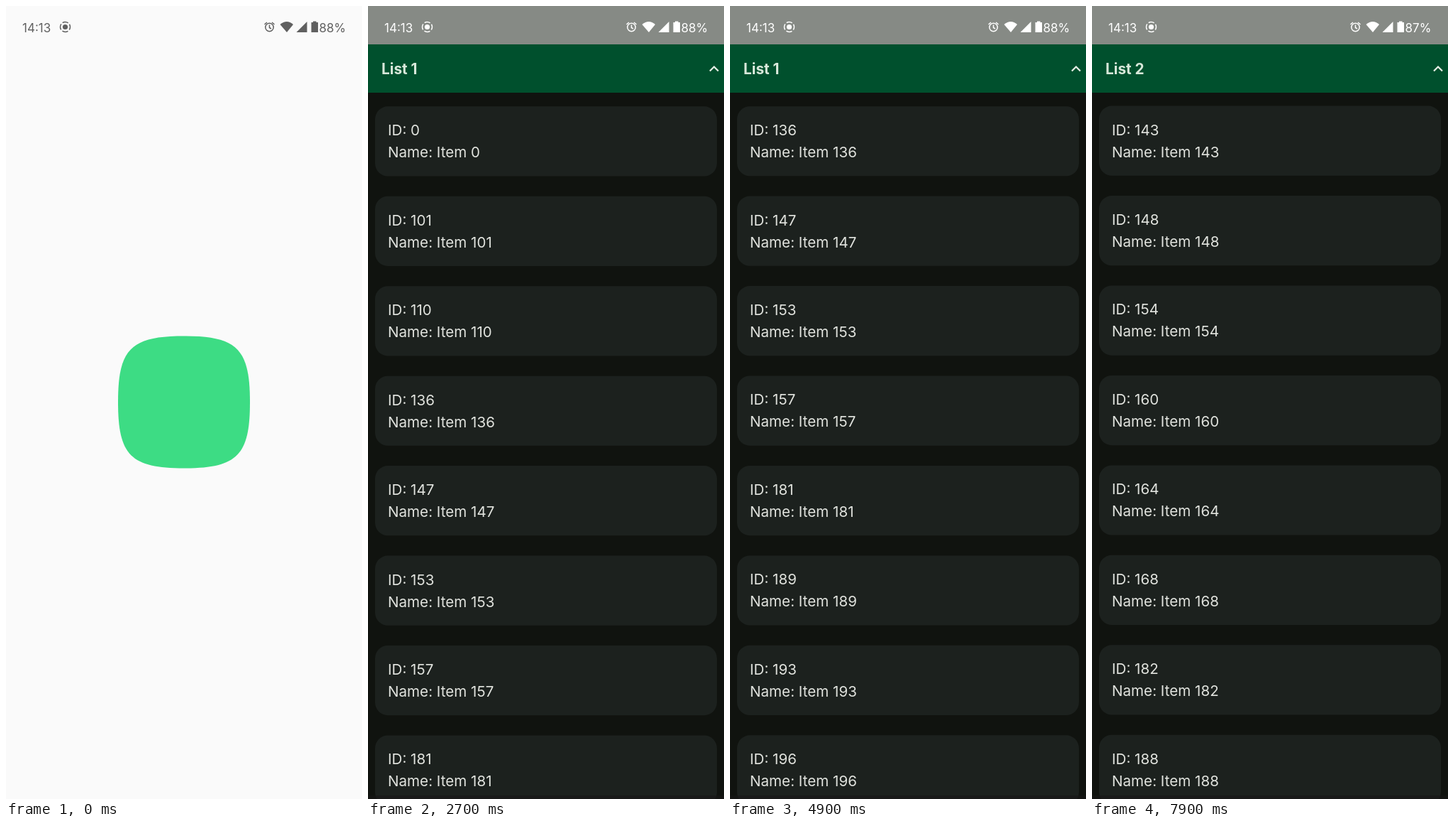
An HTML page for the animation above (8000 ms loop, 502 by 1116 pixels).

```html
<!DOCTYPE html>
<html lang="en">
<head>
<meta charset="utf-8">
<title>Expandable lists</title>
<style>
  html, body { margin: 0; width: 100%; height: 100%; overflow: hidden; background: #10130f; }
  svg { display: block; width: 502px; height: 1116px; font-family: Inter, Roboto, sans-serif; }
  .card rect { fill: #1c211e; }
  .card text { fill: #e1e3de; font-size: 20.6px; }
  .head text { fill: #d8e8da; font-size: 20.8px; font-weight: 700; }
  .head path { fill: none; stroke: #e6efe6; stroke-width: 2.2; }
  #status text { font-size: 17px; }
</style>
</head>
<body>
<svg id="stage" viewBox="0 0 502 1116">
  <defs>
    <radialGradient id="wave" gradientUnits="userSpaceOnUse" cx="251" cy="34" r="1">
      <stop offset=".84" stop-color="#fff" stop-opacity=".085"/>
      <stop offset="1" stop-color="#fff" stop-opacity="0"/>
    </radialGradient>
    <radialGradient id="reveal" gradientUnits="userSpaceOnUse" cx="251" cy="-3" r="1">
      <stop id="inner" offset=".842" stop-color="#fafafa"/>
      <stop offset="1" stop-color="#fafafa"/>
    </radialGradient>
  </defs>
  <rect width="502" height="1116" fill="#fafafa"/>
  <g id="app">
    <rect width="502" height="1116" fill="#10130f"/>
    <path id="spinner" fill="none" stroke="#2ae77f" stroke-width="4.8" stroke-linecap="round"/>
    <g id="lists"></g>
    <rect y="1111" width="502" height="5" fill="#181616" opacity=".6"/>
    <rect width="502" height="54" fill="#868a85"/>
  </g>
  <g id="splash">
    <rect width="502" height="1116" fill="url(#reveal)"/>
    <path id="icon" fill="#3ddc84" d="M251 464.500c75 0 93 18 93 93s-18 93-93 93s-93-18-93-93s18-93 93-93Z"/>
  </g>
  <g id="status">
    <text x="23" y="36.500">14:13</text>
    <circle cx="83.500" cy="29.500" r="3.600"/>
    <circle cx="83.500" cy="29.500" r="7" fill="none" stroke="currentColor" stroke-width="1.500" stroke-dasharray="8.500 2.500" stroke-dashoffset="4.250"/>
    <g fill="none" stroke="currentColor" stroke-width="1.500">
      <circle cx="371.500" cy="30" r="5.700"/>
      <path d="M371.500 26.500V30.500L374 32M364.500 26L368 23M375 23L378.500 26"/>
    </g>
    <path d="M386.500 26Q396 18 405 26L396 37Z"/>
    <path d="M409.500 37H424.500V22Z"/>
    <path d="M433 21.500H437.500V23H440V37H430.500V23H433Z"/>
    <text id="battery" x="441.500" y="36.500">88%</text>
  </g>
</svg>
<script>
const $ = id => document.getElementById(id);
const LOOP = 8000, STEP = 100;
const TOP = 54, HEAD = 68, PITCH = 77.3;
const CARD_OFFSET = 87.3, CARD_PITCH = 126.45;
const ITEMS = [
  [0, 101, 110, 136, 147, 153, 157, 181, 189, 193, 196],
  [117, 129, 143, 148, 154, 160, 164, 168, 182, 188]
];
const TAPS = [[2700, 0], [5400, 0], [6100, 1]];

// time, value pairs, joined by straight lines
const SCROLL_END = [[4300, 376.8], [4900, 379.5]];
const SCROLL_SLOW = [[7700, 330], [7900, 330.9]];
const RADIUS = [[0, 1], [100, 170], [200, 600], [300, 1188], [400, 2400]];
const VEIL = [[0, 1], [100, .9], [200, .6], [300, .267], [400, .07], [500, 0]];
const ICON = [[0, 1], [100, .65], [200, .18], [300, 0]];
const SHIFT = [[0, 14], [100, 10], [200, 5], [300, 1.5], [400, .4], [500, 0]];

const clamp = x => Math.max(0, Math.min(1, x));
const easeOut = x => 1 - (1 - clamp(x)) ** 2;

function track(keys, t) {
  let [t0, v0] = keys[0];
  for (const [t1, v1] of keys) {
    if (t < t1) return t1 > t0 ? v0 + (v1 - v0) * (t - t0) / (t1 - t0) : v0;
    [t0, v0] = [t1, v1];
  }
  return v0;
}

function add(parent, tag, attrs, text) {
  const node = document.createElementNS("http://www.w3.org/2000/svg", tag);
  for (const key in attrs) node.setAttribute(key, attrs[key]);
  if (text) node.textContent = text;
  return parent.appendChild(node);
}
const set = (node, key, value) => node.setAttribute(key, value);
const show = (node, on) => { node.style.display = on ? "" : "none"; };
const moveTo = (node, y) => set(node, "transform", `translate(0 ${y.toFixed(2)})`);

const groups = ITEMS.map(ids => {
  const group = add($("lists"), "g", { class: "card" });
  ids.forEach((id, i) => {
    const y = i * CARD_PITCH;
    add(group, "rect", { x: 10, y, width: 482, height: 98.2, rx: 18 });
    add(group, "text", { x: 28, y: y + 41 }, `ID: ${id}`);
    add(group, "text", { x: 28, y: y + 72 }, `Name: Item ${id}`);
  });
  return group;
});

const heads = [1, 2, 3, 4].map(n => {
  const node = add($("lists"), "g", { class: "head" });
  add(node, "rect", { width: 502, height: HEAD, fill: "#00502d" });
  const wave = add(node, "rect", { width: 502, height: HEAD, fill: "url(#wave)" });
  add(node, "text", { x: 19, y: 41.5 }, `List ${n}`);
  return { node, wave, arrow: add(node, "path", {}) };
});

function scrollAt(t) {
  if (t < 4300) return 376.6 * easeOut((t - 3500) / 700);
  if (t < 5400) return track(SCROLL_END, t);
  if (t < 7600) return 330 * easeOut((t - 7000) / 500);
  return track(SCROLL_SLOW, t);
}

function drawLists(t) {
  const open = t >= 2700 && t < 5400 ? 0 : t >= 6100 ? 1 : -1;
  const scroll = scrollAt(t);
  heads.forEach(({ node, wave, arrow }, i) => {
    const y = TOP + i * PITCH - (open === 1 ? scroll : 0);
    moveTo(node, i === open ? Math.max(TOP, y) : y);
    show(node, open < 0 || i <= open);
    set(arrow, "d", i === open ? "M482 37.500L488 31.500L494 37.500" : "M482 31.500L488 37.500L494 31.500");
    set(wave, "opacity", 0);
  });
  groups.forEach((group, i) => {
    show(group, i === open);
    moveTo(group, TOP + i * PITCH + CARD_OFFSET - scroll);
  });
  for (const [start, row] of TAPS) {
    const age = t - start;
    if (age <= 0 || age >= 800) continue;
    set($("wave"), "r", 20 + 275 * easeOut(age / 450));
    set(heads[row].wave, "opacity", clamp(age / 100) * clamp((800 - age) / 375));
  }
}

function drawSpinner(t) {
  const point = deg => {
    const a = deg * Math.PI / 180;
    return `${251.5 + 21 * Math.cos(a)} ${585.3 + 21 * Math.sin(a)}`;
  };
  const from = -31 + (t - 300) * .45;
  const sweep = 171 - (t - 300) * .25;
  set($("spinner"), "d", `M${point(from)}A21 21 0 ${sweep > 180 ? 1 : 0} 1 ${point(from + sweep)}`);
}

function draw(t) {
  const loaded = t >= 600;
  show($("lists"), loaded);
  show($("spinner"), !loaded);
  if (loaded) drawLists(t);
  else drawSpinner(t);

  moveTo($("app"), track(SHIFT, t));
  set($("reveal"), "r", track(RADIUS, t));
  const veil = track(VEIL, t);
  set($("inner"), "stop-opacity", veil);
  show($("splash"), veil > 0);
  set($("icon"), "opacity", track(ICON, t));

  const ink = t < 200 ? "#606060" : "#fff";
  $("status").style.color = ink;
  $("status").style.fill = ink;
  $("battery").textContent = t < 7300 ? "88%" : "87%";
}

const start = performance.now();
function tick() {
  const t = (performance.now() - start) % LOOP;
  draw(Math.floor(t / STEP) * STEP);
  requestAnimationFrame(tick);
}
tick();
</script>
</body>
</html>
```
